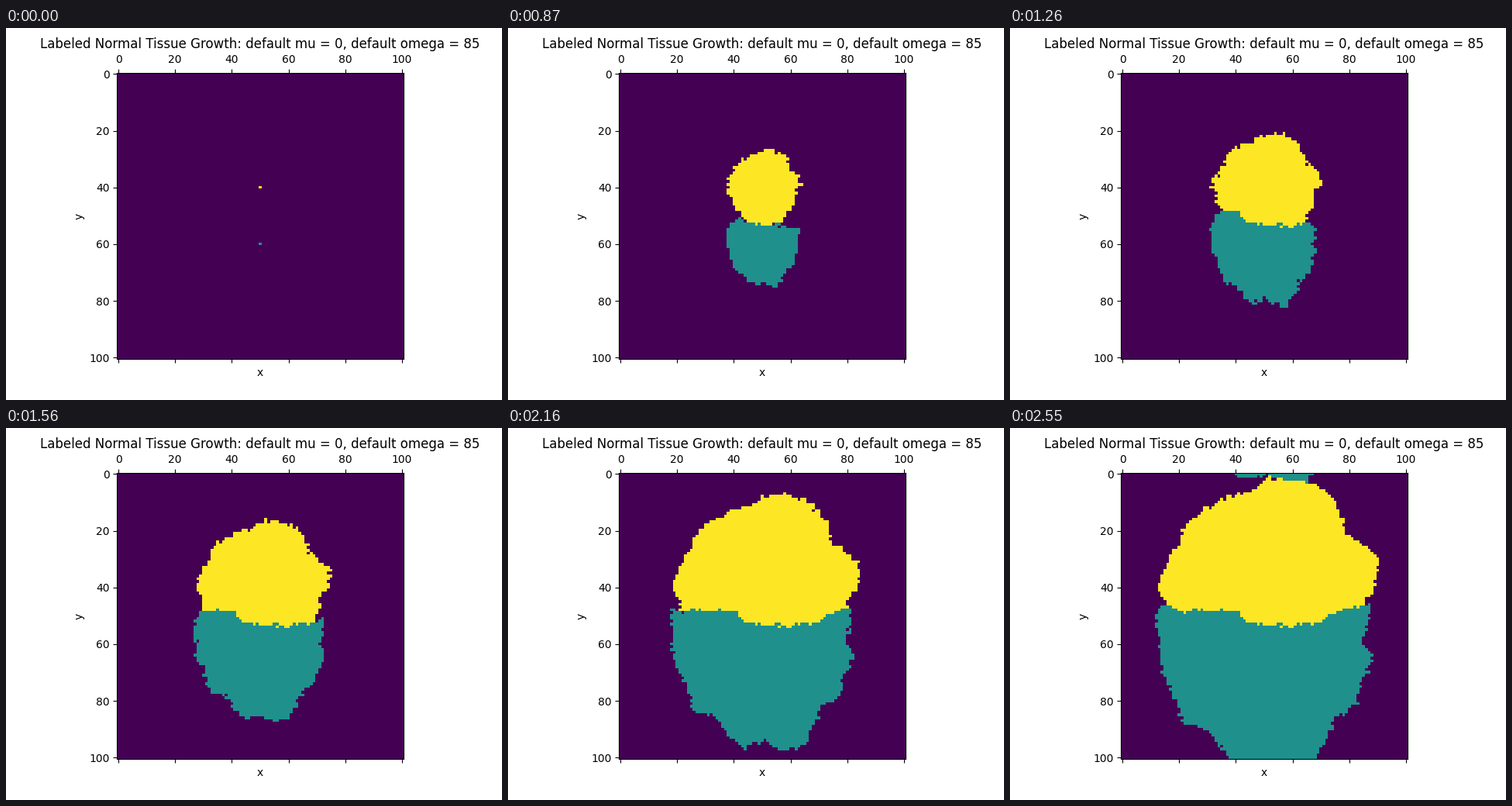
These frames come from a looping animation (640 by 480 pixels, 6.67 s). A matplotlib script:

```python
import numpy as np
import matplotlib.pyplot as plt
from matplotlib.animation import FuncAnimation

SIZE = 101
STEP_MS, STEPS = 30, 85
INTERVAL, FRAMES = 29, 230
UPPER, LOWER = (40, 50), (60, 50)

# (direction in degrees, cells reached by the last step)
UPPER_REACH = [
    (-90, 48), (-45, 38), (-8, 35.5), (0, 39.3), (14, 41.5), (33, 34.2),
    (50, 39), (66, 40.3), (87, 38.5), (99, 34.2), (120, 34.3), (145, 35.5),
    (152, 33.5), (180, 37.5), (190, 34.5), (230, 36)]
LOWER_REACH = [
    (-174, 37), (-146, 36.8), (-136, 40.5), (-125, 36), (-114, 39.5),
    (-101, 44), (-88, 41), (-80, 45), (-71, 47), (-57, 40), (-46, 36),
    (-34, 39), (-20, 36.7), (-7, 38.8), (1, 34.6), (20, 40), (50, 36),
    (90, 34), (125, 39), (160, 39.5)]
# (column, row) along the line where the two tissues meet
MEETING = [(13, 45), (20, 48.5), (40, 48), (43, 52), (58, 53.5), (68, 53),
           (78, 48), (90, 45)]

rng = np.random.default_rng(5)
rows, cols = np.mgrid[0:SIZE, 0:SIZE]


def arrival(seed, reach, rows):
    """Step at which a front of steady speed per direction gets to each cell."""
    up, right = seed[0] - rows, cols - seed[1]
    angle = np.degrees(np.arctan2(up, right))
    return STEPS * np.hypot(up, right) / np.interp(angle, *zip(*reach), period=360)


def touching(grown):
    """Grown cells and their neighbours, with edges that wrap around."""
    near = grown.copy()
    for axis in (0, 1):
        for shift in (-1, 1):
            near |= np.roll(grown, shift, axis)
    return near


def grow():
    """Step at which each cell is taken, and the tissue that takes it."""
    upper = arrival(UPPER, UPPER_REACH, rows)
    lower = arrival(LOWER, LOWER_REACH, rows)
    wrapped = arrival(LOWER, LOWER_REACH, rows + SIZE)
    above = rows < np.interp(cols, *zip(*MEETING)) + rng.normal(0, 0.4, rows.shape)
    labels = np.where(above & (upper < wrapped), 2, 1)
    due = np.where(above, np.minimum(upper, wrapped), lower)
    due = np.maximum(due + rng.normal(0, 1.3, due.shape), 1)

    taken = np.full((SIZE, SIZE), np.inf)
    taken[UPPER] = taken[LOWER] = 0
    for step in range(1, STEPS + 1):
        grown = taken < step
        taken[touching(grown) & ~grown & (due <= step)] = step
    return taken, labels


taken, labels = grow()


def tissue(step):
    return np.where(taken <= step, labels, 0)


fig, ax = plt.subplots(figsize=(6.4, 4.8), dpi=100)
image = ax.matshow(tissue(0), cmap="viridis", vmin=0, vmax=2)
ax.set_title("Labeled Normal Tissue Growth: default mu = 0, default omega = 85")
ax.set_xlabel("x")
ax.set_ylabel("y")


def update(i):
    step = min((i * INTERVAL + INTERVAL - 1) // STEP_MS, STEPS)
    image.set_data(tissue(step))
    return [image]


anim = FuncAnimation(fig, update, frames=FRAMES, interval=INTERVAL, repeat=True)
plt.show()
```
